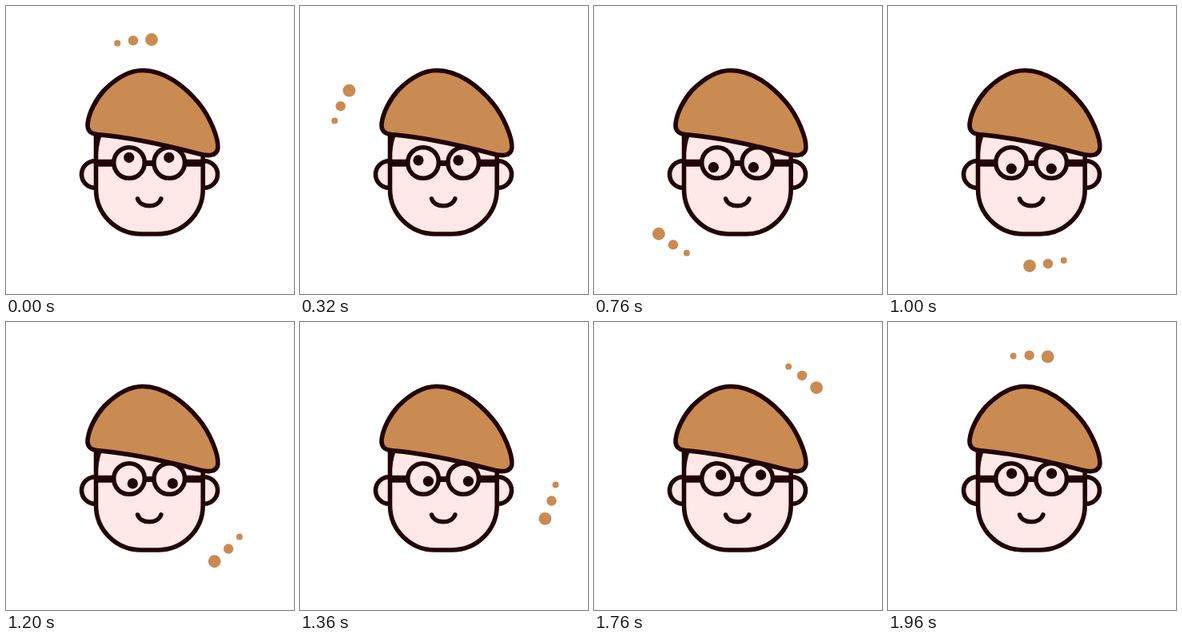
These frames come from a looping animation (360x360 px, 2 s). An HTML page:

```html
<!DOCTYPE html>
<html lang="en">
<head>
<meta charset="utf-8">
<title>Looking around</title>
<style>
  html, body { margin: 0; width: 100%; height: 100%; overflow: hidden; background: #fff; }
  svg { display: block; width: 100vw; height: 100vh; }
  .line { stroke: #220406; stroke-width: 5.6; stroke-linecap: round; stroke-linejoin: round; }
  .skin { fill: #ffe8e7; }
  .dark { fill: #220406; }
  .tan { fill: #c98b52; }
  .open { fill: none; }
</style>
</head>
<body>
<svg viewBox="0 0 360 360">
  <g class="line skin">
    <circle cx="111.3" cy="210.5" r="16.8"/>
    <circle cx="247.7" cy="210.5" r="16.8"/>
    <path d="M112.5 150V229A56 56 0 0 0 168.500 285H190.200A56 56 0 0 0 246.200 229V150Z"/>
  </g>
  <path class="dark" d="M110 156H122Q116.500 168 115 184H110Z"/>
  <path class="line tan" d="M171 80.5C153 80.5 137 91 123 105C112 117 104 133 102.2 146
    C101 155 105 159.5 114 160.6C150 163.5 198 173.5 240 184.5C254 188.5 263.5 187 264.8 178
    C266 165 254 137 241 121.5C223 100 198 80.5 171 80.5Z"/>
  <path class="dark" d="M112 191.700H135V200.700H112ZM174 193H185V200H174ZM224 191.700H247V200.700H224Z"/>
  <g class="line skin">
    <circle cx="154" cy="196" r="19.300"/>
    <circle cx="204.200" cy="196" r="19.300"/>
  </g>
  <path class="line open" d="M164.600 241C168 252.700 190 252.700 193.800 241"/>
  <g class="dark">
    <circle class="pupil" r="6.600"/>
    <circle class="pupil" r="6.600"/>
  </g>
  <g class="tan">
    <circle class="dot" r="7.900"/>
    <circle class="dot" r="6.200"/>
    <circle class="dot" r="4"/>
  </g>
</svg>
<script>
  const LOOP = 2000, STEP = 40;
  const pupils = document.querySelectorAll('.pupil');
  const dots = document.querySelectorAll('.dot');
  const orbits = [
    { cy: 183.4, r: 141.4, lead: -1 },
    { cy: 182.7, r: 141, lead: 8.35 },
    { cy: 182.2, r: 141.6, lead: 16.5 }
  ];

  // Angles run counter-clockwise from the top.
  function place(el, cx, cy, r, degrees) {
    const a = degrees * Math.PI / 180;
    el.setAttribute('cx', cx - r * Math.sin(a));
    el.setAttribute('cy', cy - r * Math.cos(a));
  }

  function draw(ms) {
    const time = Math.floor((ms % LOOP) / STEP) * STEP;
    const turn = 360 * time / LOOP;
    dots.forEach((dot, i) => {
      const { cy, r, lead } = orbits[i];
      place(dot, 179.5, cy, r, turn + lead);
    });
    pupils.forEach((pupil, i) => place(pupil, 154 + 50 * i, 196.4, 7, turn + 2));
  }

  const start = performance.now();
  function tick() {
    draw(performance.now() - start);
    requestAnimationFrame(tick);
  }
  tick();
</script>
</body>
</html>
```
